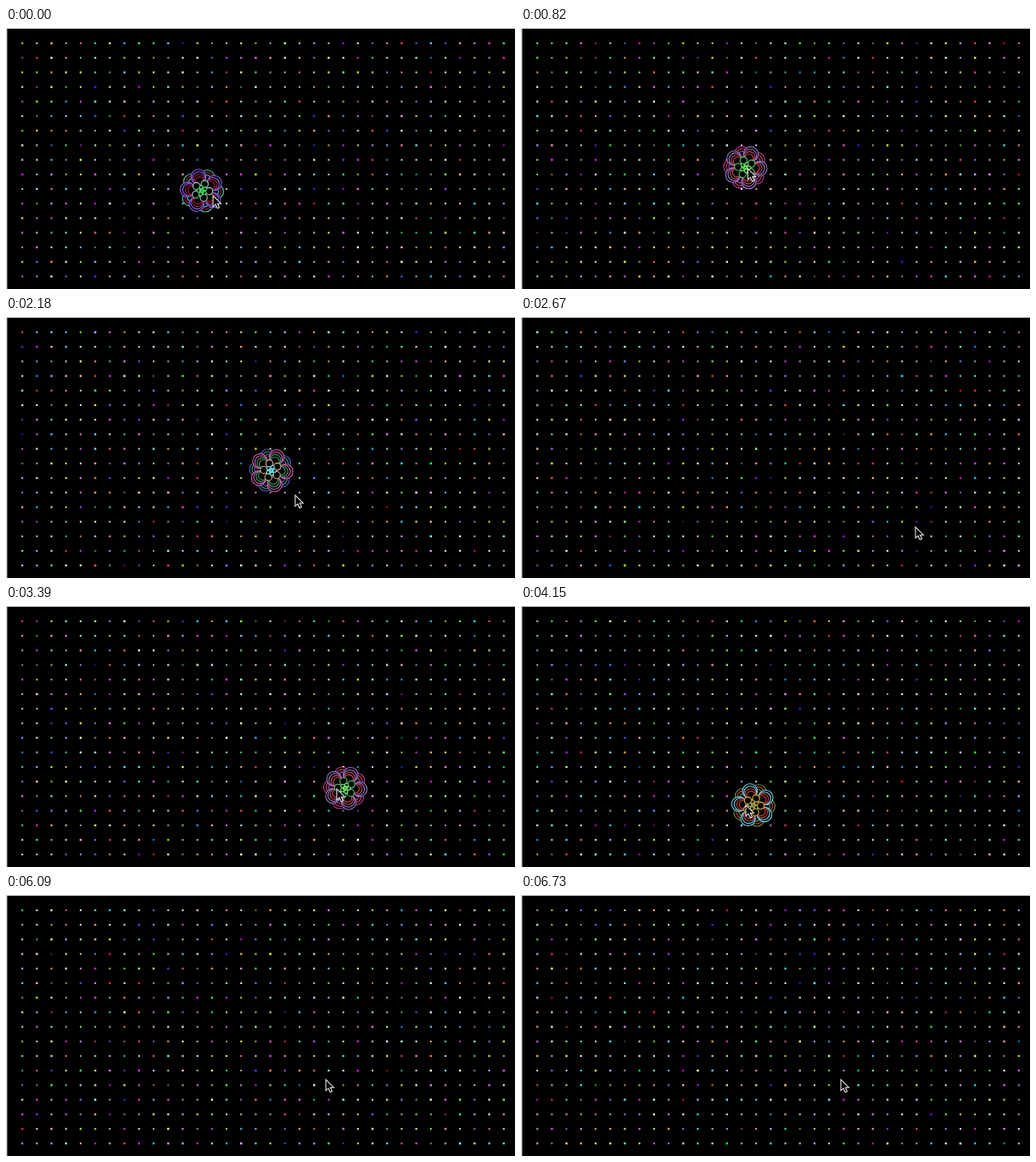
An HTML page with a canvas for the animation above (6760 ms loop, 600 px wide and 308 px high).

```html
<!DOCTYPE html>
<html lang="en">
<head>
<meta charset="utf-8">
<title>Flower and dots</title>
<style>
html, body { margin: 0; width: 100%; height: 100%; overflow: hidden; background: #000; }
canvas { display: block; width: 600px; height: 308px; }
</style>
</head>
<body>
<canvas id="stage" width="600" height="308"></canvas>
<script>
const ctx = document.getElementById('stage').getContext('2d');
const LOOP = 6760, STEP = 30.315, PITCH = 17.2;

// Keys: time, x, y
const pointerPath = [[0, 244, 197], [700, 270, 165], [1670, 207, 169], [2670, 465, 247],
  [3350, 390, 215], [4150, 265, 234], [4970, 111, 209], [5330, 195, 287], [6000, 377, 217], [6760, 377, 217]];
const flowerPath = [[0, 231, 192], [760, 265, 165], [1670, 215, 131], [2350, 330, 190],
  [3350, 400, 215], [4150, 274, 235], [4970, 146, 149], [5400, 190, 282]];
const hidden = t => (t > 2250 && t < 3350) || t > 5450;

// Colours: back petals, front petals, inner arcs, small ring, core
const palettes = [
  { colors: ['#54c9a0', '#8b62f2', '#a01c3c', '#98d8c0', '#42d86a'] },
  { colors: ['#c78c3a', '#54a8e0', '#7740b8', '#d8d04e', '#e06688'] },
  { colors: ['#5066d8', '#d060b0', '#3d9a60', '#e0a888', '#70d8e0'], turned: true },
  { colors: ['#287b50', '#426b58', '#719c88', '#b0a06c', '#48b8d8'], open: true },
  { colors: ['#708c30', '#72d4ec', '#c84038', '#e2b83c', '#a8a040'] },
  { colors: ['#a04a88', '#72c850', '#406cb0', '#d882d0', '#e8b050'] },
  { colors: ['#c03c98', '#9a78c8', '#c84858', '#50cf7b', '#68e060'], turned: true }
];

function makeRandom(seed) {
  let s = (seed * 747796405 + 2891336453) >>> 0;
  return () => {
    s = (s + 0x6D2B79F5) >>> 0;
    let v = Math.imul(s ^ s >>> 15, s | 1);
    v ^= v + Math.imul(v ^ v >>> 7, v | 61);
    return ((v ^ v >>> 14) >>> 0) / 4294967296;
  };
}

function pointAt(path, t) {
  let i = 1;
  while (i < path.length - 1 && t > path[i][0]) i++;
  const [t0, x0, y0] = path[i - 1], [t1, x1, y1] = path[i];
  const p = Math.min(1, Math.max(0, (t - t0) / (t1 - t0)));
  const e = p * p * (3 - 2 * p);
  return [x0 + (x1 - x0) * e, y0 + (y1 - y0) * e];
}

function drawDots(frame) {
  const random = makeRandom(frame + 1);
  const channel = () => Math.floor(255 * random() ** 0.55);
  for (let row = 0; row < 17; row++) {
    for (let col = 0; col < 34; col++) {
      const size = 1.9 + random() * 0.6;
      ctx.fillStyle = `rgb(${channel()},${channel()},${channel()})`;
      ctx.fillRect(19.2 + col * PITCH - size / 2, 18 + row * PITCH - size / 2, size, size);
    }
  }
}

function ring(distance, radius, degrees, color, filled = true) {
  ctx.strokeStyle = color;
  for (let i = 0; i < 5; i++) {
    const a = (degrees + i * 72) * Math.PI / 180;
    ctx.beginPath();
    ctx.arc(distance * Math.cos(a), distance * Math.sin(a), radius, 0, Math.PI * 2);
    if (filled) ctx.fill();
    ctx.stroke();
  }
}

function drawFlower([x, y], { colors, open, turned }) {
  const [back, front, arcs, small, core] = colors;
  const frontAngle = turned ? -68 : -104;
  const backAngle = frontAngle + 36;
  ctx.save();
  ctx.translate(x, y);
  ctx.fillStyle = '#000';
  ctx.lineWidth = 1.1;
  for (let i = 0; i < 3; i++) ring(17 - i * 2, 8.5 - i, backAngle, i === 1 ? arcs : back);
  if (open) {
    for (let i = 0; i < 4; i++) ring(8 + i * 2, 4 + i, frontAngle, arcs, false);
    ring(17, 9, frontAngle, front);
  } else {
    for (let i = 0; i < 4; i++) ring(17 - i * 1.8, 8.7 - i * 1.2, frontAngle, i < 2 ? front : arcs);
    ring(8.5, 4.2, backAngle, small);
  }
  ring(4, 2, frontAngle, open ? small : core);
  ring(2, 1, backAngle, core, false);
  ctx.restore();
}

const arrow = new Path2D('M0 0V13L3 10.4L5.2 15L7.5 14L5.4 9.4H9.4Z');

function drawPointer([x, y]) {
  ctx.save();
  ctx.translate(x, y + 0.8);
  ctx.fillStyle = '#000';
  ctx.strokeStyle = '#e4e4e4';
  ctx.lineWidth = 1.1;
  ctx.fill(arrow);
  ctx.stroke(arrow);
  ctx.restore();
}

function draw(time) {
  const frame = Math.min(222, Math.floor((time + 5) / STEP));
  const t = frame * STEP;
  ctx.fillStyle = '#000';
  ctx.fillRect(0, 0, 600, 308);
  drawDots(frame);
  if (!hidden(t)) drawFlower(pointAt(flowerPath, t), palettes[frame % palettes.length]);
  ctx.fillStyle = '#ccc';
  ctx.fillRect(0, 0, 600, 1);
  ctx.fillStyle = '#ddd';
  ctx.fillRect(0, 0, 1.4, 308);
  drawPointer(pointAt(pointerPath, t));
}

let start;
function tick(now) {
  start ??= now;
  draw((now - start) % LOOP);
  requestAnimationFrame(tick);
}
draw(0);
requestAnimationFrame(tick);
</script>
</body>
</html>
```
